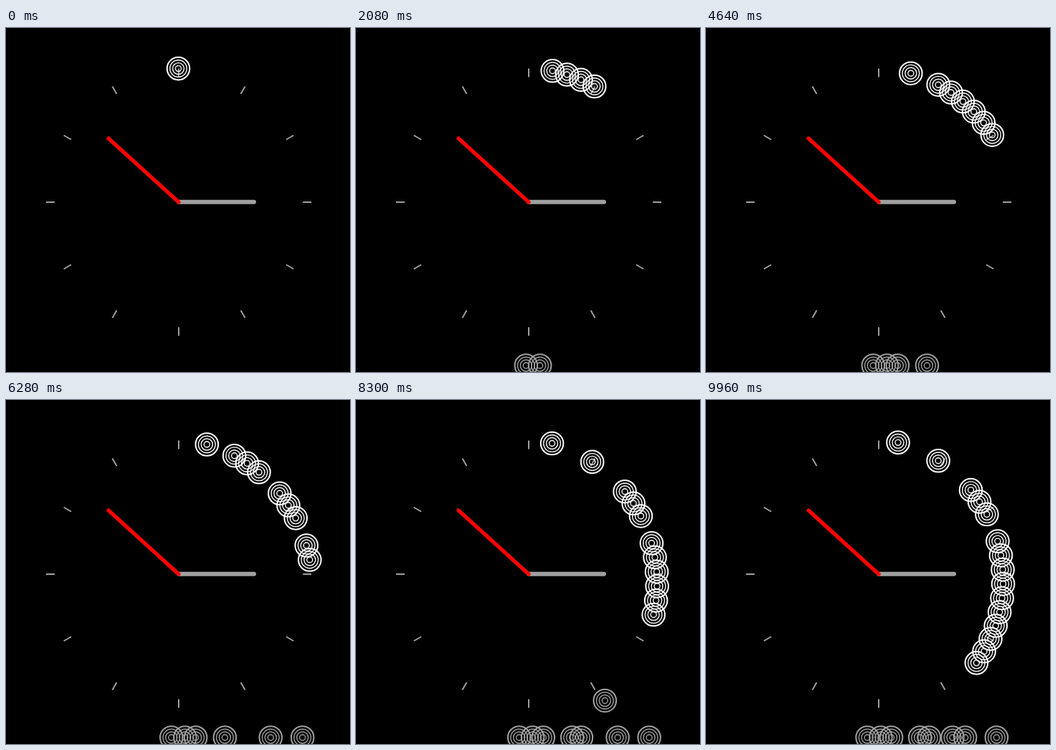
Recreate the animation shown at these times as an HTML page. Size 480 by 480 pixels, loop 9980 ms.

```html
<!DOCTYPE html>
<html lang="en">
<head>
<meta charset="utf-8">
<title>Clock</title>
<style>
html, body { margin: 0; width: 100%; height: 100%; overflow: hidden; background: #000; }
svg { display: block; width: 100vw; height: 100vh; }
</style>
</head>
<body>
<svg viewBox="0 0 480 480">
  <g id="ticks" stroke="#a0a0a0" stroke-width="2"></g>
  <path d="M241 242.8H346" stroke="#a0a0a0" stroke-width="6" stroke-linecap="round"/>
  <path d="M241 243L143 154" stroke="#f00" stroke-width="5.3" stroke-linecap="round"/>
  <g id="rings" fill="none"></g>
</svg>
<script>
const NS = 'http://www.w3.org/2000/svg';
const LOOP = 9980, FRAME = 20;
const CX = 241, CY = 243, FLOOR = 471;
const SQUEEZE = 0.9925; // the dial is slightly narrower than tall
const STEP = 0.46, LEAD = 0.24, COUNT = 23;
const DRIFT = 3.35, GRAVITY = 1000;
// ring index -> second at which it drops
const drops = { 0: 0, 1: 0.3, 2: 3.6, 4: 2.65, 5: 6.625, 7: 7.5, 8: 5.4, 12: 5.4 };

function add(parent, name, attrs) {
  const el = document.createElementNS(NS, name);
  for (const key in attrs) el.setAttribute(key, attrs[key]);
  return parent.appendChild(el);
}

const ticks = document.getElementById('ticks');
for (let i = 0; i < 12; i++) {
  add(ticks, 'path', {
    d: 'M0 -186.5V-174.5',
    transform: `translate(${CX} ${CY}) scale(${SQUEEZE} 1) rotate(${i * 30})`
  });
}

function makeRing(k) {
  const g = add(document.getElementById('rings'), 'g', {});
  [15.8, 11.8, 8, 4].forEach((r, i) =>
    add(g, 'circle', { r, 'stroke-width': i ? 1.4 : 2 }));
  const a = k * Math.PI / 30;
  const ring = {
    g,
    born: Math.max(0, k * STEP - LEAD),
    x: CX - 0.5 + 186 * SQUEEZE * Math.sin(a),
    y: CY - 0.4 - 186 * Math.cos(a),
    rise: 0.45 + 0.09 * k,
    drop: k in drops ? drops[k] : Infinity
  };
  if (k in drops) {
    const age = ring.drop - ring.born;
    ring.dropX = ring.x - DRIFT * age;
    ring.dropY = ring.y - ring.rise * age;
    ring.slide = 1.55 + 0.004 * (ring.dropX - CX);
  }
  return ring;
}

const rings = Array.from({ length: COUNT }, (_, k) => makeRing(k));

function place(r, t) {
  const age = t - r.born, fall = t - r.drop;
  if (fall < 0) return [r.x - DRIFT * age, r.y - r.rise * age];
  return [
    r.dropX - r.slide * fall,
    Math.min(FLOOR, r.dropY + GRAVITY / 2 * fall ** 2)
  ];
}

function draw(ms) {
  const t = Math.floor(ms / FRAME) * FRAME / 1000;
  for (const r of rings) {
    const shown = t >= r.born;
    r.g.setAttribute('display', shown ? 'inline' : 'none');
    if (!shown) continue;
    const [x, y] = place(r, t);
    r.g.setAttribute('transform', `translate(${x.toFixed(2)} ${y.toFixed(2)})`);
    r.g.setAttribute('stroke', t > r.drop ? '#a0a0a0' : '#fff');
  }
}

const start = performance.now();
function tick() {
  draw((performance.now() - start) % LOOP);
  requestAnimationFrame(tick);
}
draw(0);
requestAnimationFrame(tick);
</script>
</body>
</html>
```
